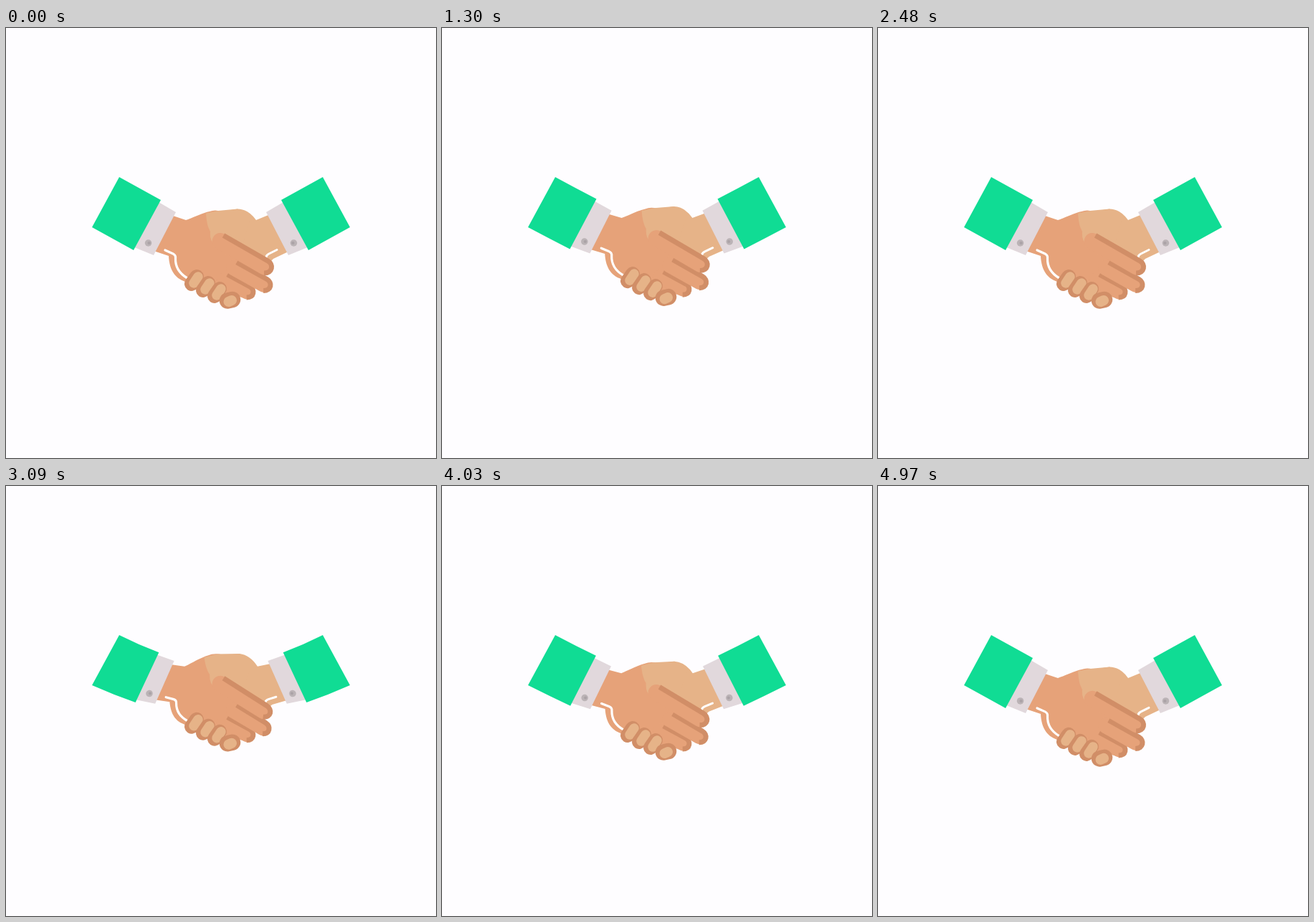
Write an HTML page that moves like this. It is 600 px wide and 600 px high and loops after 5 s.

```html
<!DOCTYPE html>
<html lang="en">
<head>
<meta charset="utf-8">
<title>Handshake</title>
<style>
  html, body { margin: 0; width: 100%; height: 100%; overflow: hidden; background: #fefdff; }
  svg { display: block; width: 100vw; height: 100vh; }
</style>
</head>
<body>
<svg id="stage" viewBox="0 0 600 600"></svg>
<script>
const LOOP = 5000;
const LIFT = 21.3;
const TURNS = [0, 575, 1130, 1740, 2480, 3110, 3750, 4375, LOOP]; // low, high, low, ...

const GREEN = '#10dc94', CUFF = '#e1d8dc', BUTTON = '#bbb3b6', BUTTON_DARK = '#aaa2a6';
const LEFT_SKIN = '#e6a279', RIGHT_SKIN = '#e6b388', SHADE = '#d18e67';

const stage = document.getElementById('stage');
const shapes = [];

const mapPoints = (d, fn) =>
  d.replace(/(-?[\d.]+)[ ,](-?[\d.]+)/g, (_, x, y) => fn(+x, +y).map(v => v.toFixed(2)).join(' '));
const mirror = d => mapPoints(d, (x, y) => [600 - x, y]);

function add(d, attrs) {
  const node = document.createElementNS('http://www.w3.org/2000/svg', 'path');
  for (const key in attrs) node.setAttribute(key, attrs[key]);
  stage.append(node);
  shapes.push({ node, d });
}
const fill = (d, color) => add(d, { fill: color });
const line = (d, color, width, cap = 'round') => add(d, {
  fill: 'none', stroke: color, 'stroke-width': width, 'stroke-linecap': cap, 'stroke-linejoin': 'round'
});
const both = (draw, d, ...rest) => { draw(d, ...rest); draw(mirror(d), ...rest); };

// Long finger: skin capsule with a shaded top edge that wraps round the tip.
function finger(startX, startY, tipX, tipY, radius) {
  const r = radius - 3.5;
  const at = (x, y) => `${tipX + x * r} ${tipY + y * r}`;
  const rootX = startX - .48 * r, rootY = startY + .88 * r;
  line(`M${rootX} ${rootY} L${tipX} ${tipY}`, LEFT_SKIN, radius * 2 - 2);
  line(`M${startX} ${startY} L${at(.48, -.88)} C${at(1.4, -.35)} ${at(1.25, 1)} ${at(-.1, 1)}`, SHADE, 7, 'butt');
}

// Curled fingertip: shaded capsule with a lighter one shifted up and right.
function knuckle(x, y) {
  line(`M${x + 4} ${y - 5} L${x - 3} ${y + 5}`, SHADE, 20);
  line(`M${x + 6} ${y - 5} L${x} ${y + 4}`, RIGHT_SKIN, 13.5);
}

// Right wrist and back of the hand
fill('M366 261 L349 268 Q338 252.5 323 252.5 L290 258 L300 300 L365 330 L373 322 L394 312 Z', RIGHT_SKIN);
line('M363 320 Q363 317 367 315 L378 309.5', '#fff', 3);

// Left hand
fill('M233 262 L251 268 C263 264 274 258 284 256 Q292 253 300 256 L308 292 L360 325 L350 360 ' +
     'L337 378 L322 374 L254 355 C236 351 228 338 227 318 L206 311 Z', LEFT_SKIN);
fill('M296 255 L323 252.5 L342 262 L330 303 L303 290 Q301 301 291 301 Q284 298 285 284 Q280 276 279 258.5 Z', RIGHT_SKIN);
line('M222 310 L233 315 Q237 317 236.5 321 C236 333 241 342 253 349', '#fff', 3.2);

finger(309, 344, 336.5, 368, 11.5);
finger(322, 327, 360, 358, 12);
finger(303.5, 289.5, 361, 333, 12.5);

knuckle(262, 352);
knuckle(278, 361);
knuckle(294, 369);
line('M309 380.5 L316 379', SHADE, 22.5);
line('M310.5 382 L315 380', RIGHT_SKIN, 14);

// Sleeves
both(fill, 'M213 243 L237 257 L206 317 L179 306 Z', CUFF);
both(fill, 'M158 208 Q187 224 216 240 L178 310 Q149 294 120 278 Z', GREEN);
both(line, 'M198.5 300 L198.6 300', BUTTON, 9.5);
both(line, 'M199.5 300 L199.6 300', BUTTON_DARK, 4);

function liftAt(t) {
  const i = TURNS.findIndex(end => end > t) - 1;
  const p = (t - TURNS[i]) / (TURNS[i + 1] - TURNS[i]);
  const eased = (1 - Math.cos(Math.PI * p)) / 2;
  return i % 2 ? 1 - eased : eased;
}

// Bends both arms upward from the fixed ends of the sleeves.
function bend(x, y, lift) {
  const side = x < 300 ? 1 : -1;
  const px = (side > 0 ? x : 600 - x) - 139, py = y - 243;
  const u = Math.min(1, Math.max(0, (px * .87 + py * .48) / 160));
  const across = py * .87 - px * .48;
  const turn = .28 * u * (1 - u) * across;
  return [x + side * turn * lift, y - LIFT * u * u * (3 - 2 * u) * lift];
}

function render(t) {
  const lift = liftAt(t);
  for (const { node, d } of shapes) {
    node.setAttribute('d', mapPoints(d, (x, y) => bend(x, y, lift)));
  }
}

const start = performance.now();
function tick() {
  render((performance.now() - start) % LOOP);
  requestAnimationFrame(tick);
}
tick();
</script>
</body>
</html>
```
